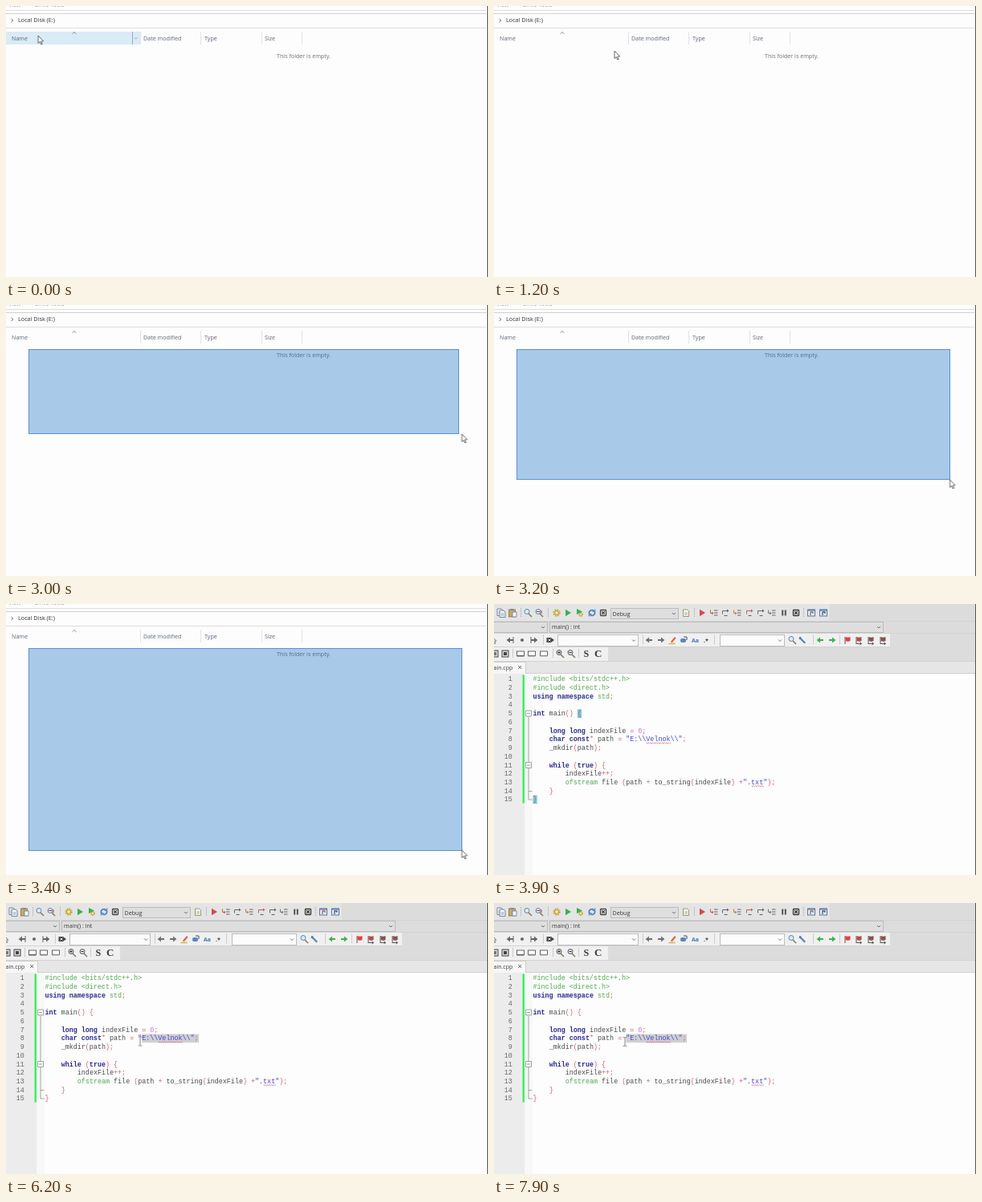
An HTML page for the animation above (8000 ms loop, 600x338 px).

```html
<!DOCTYPE html>
<html lang="en">
<head>
<meta charset="utf-8">
<title>Folder and editor</title>
<style>
html, body { margin: 0; width: 100%; height: 100%; overflow: hidden; background: #fff; }
svg { display: block; width: 100%; height: 100%; }
text { font: 7.15px "Open Sans", "Noto Sans", sans-serif; fill: #5b6776; }
.ui text { fill: #3a3a3a; }
.code text { font: 8.4px "Liberation Mono", "Courier New", monospace; fill: #4a4a4a; }
.code .num { fill: #686868; text-anchor: end; }
.pre, .type { fill: #4fa850; }
.key { fill: #2b2b92; font-weight: bold; }
.str { fill: #4646d6; }
.dig { fill: #d56cd0; }
.op { fill: #d8606c; }
.hover rect { fill: #d9ebf7; }
.hover path { fill: none; stroke: #8d9fae; stroke-width: .8; }

.anim { animation: 8s step-end infinite; }
#folder { animation-name: folder; }
#editor { animation-name: editor; }
#hoverName { animation-name: hoverName; }
#hoverDate { animation-name: hoverDate; }
#hoverType { animation-name: hoverType; }
#arrow { animation-name: arrow; }
#drag { animation-name: drag; }
#braces { animation-name: braces; }
#caret { animation-name: caret; }
#ibeam { animation-name: ibeam; }
#mark { animation-name: mark; }

@keyframes folder { 0% { opacity: 1 } 46.25%, 100% { opacity: 0 } }
@keyframes editor { 0% { opacity: 0 } 46.25%, 100% { opacity: 1 } }
@keyframes hoverName { 0% { opacity: 1 } 3.75%, 100% { opacity: 0 } }
@keyframes hoverDate { 0% { opacity: 0 } 3.75% { opacity: 1 } 5%, 100% { opacity: 0 } }
@keyframes hoverType { 0% { opacity: 0 } 5% { opacity: 1 } 7.5%, 100% { opacity: 0 } }
@keyframes arrow {
  0% { transform: translate(40px, 37px); animation-timing-function: steps(5) }
  6.25% { transform: translate(317px, 33px) }
  7.5% { transform: translate(310px, 20px); animation-timing-function: steps(3) }
  11.25% { transform: translate(197px, 11px) }
  12.5% { transform: translate(194px, 15px) }
  13.75% { transform: translate(188px, 20px) }
  15% { transform: translate(150px, 56px); animation-timing-function: steps(2) }
  17.5% { transform: translate(90px, 75px); animation-timing-function: steps(4) }
  22.5% { transform: translate(28px, 55px); animation-timing-function: steps(2) }
  25% { transform: translate(60px, 67px) }
  30% { transform: translate(253px, 88px); animation-timing-function: steps(3) }
  33.75% { transform: translate(425px, 116px); animation-timing-function: steps(3) }
  37.5% { transform: translate(567.5px, 161px); animation-timing-function: steps(2) }
  40% { transform: translate(567.5px, 218px); animation-timing-function: steps(2) }
  42.5%, 100% { transform: translate(567.5px, 307px) }
}
@keyframes drag {
  0% { width: 0; height: 0 }
  22.5% { width: 0; height: 0; animation-timing-function: steps(2) }
  25% { width: 32px; height: 12px }
  30% { width: 224px; height: 32px; animation-timing-function: steps(3) }
  33.75% { width: 394px; height: 60px; animation-timing-function: steps(3) }
  37.5% { width: 535px; height: 105px; animation-timing-function: steps(2) }
  40% { width: 539px; height: 162px; animation-timing-function: steps(2) }
  42.5%, 100% { width: 539px; height: 252px }
}
@keyframes braces { 0% { opacity: 1 } 66.25%, 100% { opacity: 0 } }
@keyframes caret { 0% { opacity: 0 } 66.25% { opacity: 1 } 70%, 100% { opacity: 0 } }
@keyframes ibeam {
  0% { opacity: 0; transform: translate(303px, 294px) }
  52.5% { opacity: 1; transform: translate(303px, 294px); animation-timing-function: steps(9) }
  63.75% { opacity: 1; transform: translate(248.5px, 170.5px) }
  68.75% { opacity: 1; transform: translate(248.5px, 170.5px); animation-timing-function: steps(7) }
  77.5% { opacity: 1; transform: translate(167px, 172.5px) }
  81.25% { opacity: 1; transform: translate(168px, 173px); animation-timing-function: steps(4) }
  92.5% { opacity: 1; transform: translate(167px, 173px); animation-timing-function: steps(5) }
  97.5%, 100% { opacity: 1; transform: translate(163px, 173px) }
}
@keyframes mark {
  0% { width: 0 }
  68.75% { width: 0; animation-timing-function: steps(7) }
  77.5% { width: 70.6px }
  93.75%, 100% { width: 75.6px }
}
</style>
</head>
<body>
<svg viewBox="0 0 600 338" preserveAspectRatio="none">
  <defs>
    <g id="page"><path d="M-3.5-4h5l2 2v6.5h-7z" fill="#f4f4f4" stroke="currentColor" stroke-width=".9"/><path d="M-2 0h4M-2 2h4" stroke="currentColor" stroke-width=".7"/></g>
    <g id="copy"><use href="#page" x="-1.5" y="-1"/><use href="#page" x="1.5" y="1"/></g>
    <g id="paste"><rect x="-4.5" y="-4" width="8" height="9" fill="#c4a868" stroke="#8a7444" stroke-width=".8"/><path d="M-2.5-5h4v2h-4z" fill="#888"/><rect x="0" y="-1" width="5" height="6" fill="#f4f4f4" stroke="#66809f" stroke-width=".8"/></g>
    <g id="lens"><path d="M1 1l4 4" stroke="#8a7a5a" stroke-width="1.6"/><circle cx="-1" cy="-1.5" r="3" fill="#dcebf6" stroke="currentColor" stroke-width="1"/></g>
    <g id="swap"><use href="#lens"/><path d="M-3-1.5h4M3-3v4" stroke="#a04040" stroke-width="1"/></g>
    <g id="zoom"><use href="#lens"/><path d="M-2.7-1.5h3.4" stroke="#222" stroke-width=".9"/></g>
    <g id="zoomin"><use href="#zoom"/><path d="M-1-3.2v3.4" stroke="#222" stroke-width=".9"/></g>
    <g id="gear"><circle r="3.8" fill="none" stroke="currentColor" stroke-width="1.8" stroke-dasharray="1.7 1.28"/><circle r="2.5" fill="#f4ecc0" stroke="currentColor" stroke-width="1.5"/></g>
    <path id="play" d="M-3-4.3L4 0l-7 4.3z" fill="currentColor"/>
    <g id="build"><g transform="translate(1 2) scale(.65)" color="#c8ac40"><use href="#gear"/></g><path d="M-4-5L3-1.500l-7 3.500z" fill="#3cb050"/></g>
    <g id="redo" fill="none" stroke="currentColor" stroke-width="1.7"><path d="M-3.500 1a3.600 3.600 0 0 1 6-3.400M3.500-1a3.600 3.600 0 0 1-6 3.400"/><path d="M3.700-4.500v3h-3M-3.700 4.500v-3h3" stroke-width="1.1"/></g>
    <g id="stop" fill="#eee" stroke="currentColor"><rect x="-3.500" y="-3.500" width="7" height="7" rx=".8" stroke-width="1.300"/><path d="M-1.800-1.800l3.600 3.600M1.800-1.800l-3.600 3.600" stroke-width="1.300"/></g>
    <g id="into"><path d="M0-3h4.500M0 0h4.500M0 3h4.500" stroke="#666"/><path d="M-4.500-3.500v4h2" fill="none" stroke="currentColor"/><path d="M-2.800-1.500L-.5.500l-2.300 2z" fill="currentColor"/></g>
    <g id="over"><path d="M-1.500 3.500h4" stroke="#666" stroke-width="1.100"/><path d="M-3.500 1.500v-4h6" fill="none" stroke="currentColor"/><path d="M2-4.500l2.500 2L2-.500z" fill="currentColor"/></g>
    <path id="pause" d="M-2.800-3.500h2v7h-2zM.8-3.500h2v7h-2z" fill="currentColor"/>
    <g id="win"><rect x="-4.500" y="-4" width="9" height="8" fill="#e6eef6" stroke="#5478ac"/><path d="M-4.500-3.200h9" stroke="#5478ac" stroke-width="1.400"/><path d="M-1 3v-4h3v2" fill="none" stroke="currentColor" stroke-width="1.300"/></g>
    <path id="right" d="M-4-1.100h4v-2.300L4.400 0 0 3.400V1.100h-4z" fill="currentColor"/>
    <path id="left" d="M4-1.100H0v-2.300L-4.400 0 0 3.400V1.100h4z" fill="currentColor"/>
    <g id="prev"><use href="#left"/><path d="M4-4v8" stroke="currentColor"/></g>
    <g id="next"><use href="#right"/><path d="M-4-4v8" stroke="currentColor"/></g>
    <g id="flag"><path d="M-3-4v9" stroke="#666" stroke-width="1.100"/><path d="M-2.500-4q3 1.600 6 0v5q-3 1.600-6 0z" fill="currentColor"/></g>
    <g id="jump"><use href="#flag"/><path d="M-3 4.500h6.500M1.500 2.500l2 2-2 1.500" fill="none" stroke="#444" stroke-width=".9"/></g>
    <g id="pen"><path d="M-2 2l5-6 1.500 1.500-5 6z" fill="#d8604c"/><path d="M-4.500 4.500h8" stroke="#d8b440" stroke-width="1.500"/></g>
    <g id="match"><rect x="-4" y="-2" width="7" height="5" rx="2" fill="currentColor"/><path d="M0-4h4v4" fill="none" stroke="#456"/></g>
    <path id="wrench" d="M-4-4l2 0 1 2 5 5-1.500 1.500-5-5-2-1z" fill="currentColor"/>
    <g id="tag"><path d="M-4.500-3h5.500L5 0 1 3h-5.500z" fill="currentColor"/><path d="M-2.500-1.500l3 3m0-3l-3 3" stroke="#fff" stroke-width=".9"/></g>
    <circle id="dot" r="2" fill="currentColor"/>
    <path id="cursor" d="M-3-5v8l2-1.500 1.500 3L2 4 .500 1H3z" fill="#f8f8f8" stroke="currentColor" stroke-width=".8"/>
    <g id="box"><rect x="-4.500" y="-3" width="9" height="5.500" fill="#fff" stroke="#555" stroke-width=".9"/><path d="M-4.500 3h9" stroke="currentColor"/></g>
    <g id="panel"><rect x="-4" y="-4" width="8" height="8" fill="#ddd" stroke="#444"/><rect x="-2" y="-2" width="4" height="4" fill="currentColor"/></g>
  </defs>

  <g id="folder" class="anim">
    <rect width="600" height="338" fill="#fdfdfe"/>
    <text x="3" y="1.200" fill-opacity=".7">View</text>
    <text x="36" y="1.200" fill-opacity=".7">Drive Tools</text>
    <path d="M0 5.500h598M0 27.500h598" stroke="#dedede"/>
    <path d="M0 9.500h598" stroke="#d0d0d0"/>
    <path d="M6.500 15.800l2.200 2.200-2.200 2.200" fill="none" stroke="#555" stroke-width=".9"/>
    <text x="15" y="20.400" style="fill:#333;font-size:7.250px">Local Disk (E:)</text>
    <g id="hoverName" class="anim hover"><rect y="32" width="167" height="16"/><path d="M157.500 32v16M159.700 39.200l2 2 2-2"/></g>
    <g id="hoverDate" class="anim hover"><rect x="167" y="32" width="75" height="16"/><path d="M232.500 32v16M234.700 39.200l2 2 2-2"/></g>
    <g id="hoverType" class="anim hover"><rect x="242" y="32" width="76" height="16"/><path d="M308.500 32v16M310.700 39.200l2 2 2-2"/></g>
    <path d="M167.500 32v16M242.500 32v16M318.500 32v16M368.500 32v16" stroke="#e2e2e2"/>
    <path d="M82.500 34.800l2.500-2.300 2.500 2.300" fill="none" stroke="#777" stroke-width=".8"/>
    <text x="7" y="42.600">Name</text>
    <text x="171" y="42.600">Date modified</text>
    <text x="247" y="42.600">Type</text>
    <text x="322" y="42.600">Size</text>
    <text x="337" y="64.600" style="fill:#707070">This folder is empty.</text>
    <rect id="drag" class="anim" x="28.500" y="55.500" fill="#0062be" fill-opacity=".33" stroke="#5c92c8"/>
    <path id="arrow" class="anim" d="M0 0v9.500l2.200-2 1.500 3.500 1.500-.6-1.500-3.400 2.900-.2z" fill="#fff" stroke="#444" stroke-width=".8"/>
  </g>

  <g id="editor" class="anim">
    <rect width="600" height="338" fill="#fdfdfd"/>
    <rect width="600" height="72" fill="#dcdcdc"/>
    <rect y="72" width="600" height="15" fill="#e6e6e6"/>
    <path d="M0 0h418v21H0z" fill="#e4e4e4"/>
    <path d="M0 37h493v17H0zM0 54h142v17H0z" fill="#f0f0f0"/>
    <path d="M0 21.500h600M0 36.500h600M0 53.500h493M0 71.500h600" stroke="#d2d2d2"/>
    <g class="ui" id="bars"></g>
    <g class="ui">
      <text x="147.500" y="14.500">Debug</text>
      <text x="72" y="31">main() : int</text>
      <text x="246" y="47.500" style="font-size:7px;font-weight:bold;fill:#4a76b4">Aa</text>
      <text x="261" y="48" style="font-weight:bold">.*</text>
      <text x="111.500" y="65.800" style="font:bold 12px 'Liberation Serif',serif">S</text>
      <text x="125" y="66" style="font:bold 13px 'Liberation Serif',serif">C</text>
      <path d="M0 72.500h39.500V87H0z" fill="#f7f7f7"/>
      <path d="M0 72.500h39.500V87M39 86.500h561" fill="none" stroke="#cfcfcf"/>
      <text x="-7" y="81.600" style="font-size:7px">main.cpp</text>
      <path d="M30.200 77l4 4m0-4l-4 4" stroke="#555" stroke-width=".9"/>
    </g>
    <rect y="87" width="38" height="251" fill="#ececec"/>
    <rect x="38" y="87" width="10" height="251" fill="#f8f8f8"/>
    <rect x="35.500" y="88.500" width="2.500" height="160" fill="#38f25c"/>
    <g fill="none" stroke="#999" stroke-width=".9">
      <path d="M43 140.500v56.500M43 205v39h4.500M43 233.500h4.500"/>
      <path d="M39.500 133h7v7h-7zM41 136.500h4M39.500 197.500h7v7h-7zM41 201h4"/>
    </g>
    <rect id="mark" class="anim" transform="translate(240 163.500) scale(-1 1)" height="10.700" fill="#cfcfd3"/>
    <g id="braces" class="anim" fill="#6fcbe0"><rect x="103.900" y="131.300" width="5.100" height="10.700"/><rect x="48.500" y="238.500" width="5.100" height="10.700"/></g>
    <g class="code" id="code"></g>
    <path id="caret" class="anim" d="M240.500 164v10.500" stroke="#000"/>
    <path id="ibeam" class="anim" d="M-2.200-5.500h1.500l.7.700.7-.7h1.500M0-5V5M-2.200 5.500h1.500l.7-.7.7.7h1.500" fill="none" stroke="#666" stroke-width=".8"/>
  </g>
  <path d="M599.500 0v338" stroke="#555"/>
</svg>
<script>
const put = (id, html) => document.getElementById(id).insertAdjacentHTML('beforeend', html);

// Toolbars: each row is a height and a list of icon, x, colour.
const rows = [
  [11, 'copy 9 #66809f,paste 23 #000,lens 42 #5a84b4,swap 56 #5a84b4,gear 78 #c8ac40,play 92 #3cb050,build 107 #000,redo 122 #4a80c4,stop 136 #444,page 239 #8f9460,play 259 #d84848,into 274 #c86048,over 288 #666,into 303 #c08048,over 318 #c06060,over 332 #666,into 346 #707880,pause 361 #555,stop 376 #333,win 395 #b06a40,win 410 #556'],
  [45, 'cursor 0 #666,prev 20 #666,dot 35 #666,next 50 #666,tag 70 #444,left 193 #707070,right 208 #707070,pen 222 #000,match 236 #5c86bc,lens 371 #5a84b4,wrench 384 #5c80b0,left 406 #3cb050,right 421 #3cb050,flag 440 #e04040,jump 454 #b04c4c,jump 469 #8a5050,jump 484 #8a5050'],
  [62, 'panel 1 #777,panel 14 #444,box 33 #555,box 47 #888,box 62 #aaa,zoomin 82 #555,zoom 96 #555']
];
for (const [y, list] of rows)
  for (const item of list.split(',')) {
    const [id, x, color] = item.split(' ');
    put('bars', `<use href="#${id}" x="${x}" y="${y}" color="${color}"/>`);
  }

const combo = (x, y, w, h, fill) => put('bars',
  `<rect x="${x + .5}" y="${y + .5}" width="${w}" height="${h}" fill="${fill}" stroke="#bcbcbc"/>
   <path d="M${x + w - 7} ${y + h / 2 - .5}l2 2 2-2" fill="none" stroke="#666" stroke-width=".9"/>`);
combo(145, 5, 84, 13, '#dedede');
combo(-4, 22, 70, 13, '#dedede');
combo(69, 22, 415, 13, '#dedede');
combo(79, 38, 100, 14, '#fcfcfc');
combo(281, 38, 80, 14, '#fcfcfc');

// Dotted grips between toolbars
const grip = (y, ...xs) => xs.forEach(x =>
  put('bars', `<path d="M${x}.5 ${y - 6}v12" stroke="#a8a8a8" stroke-dasharray="1 1"/>`));
grip(11, 33, 67, 249, 385);
grip(45, 61, 185, 274, 397, 430);
grip(62, 23, 73, 105);

const lines = String.raw`#include <bits/stdc++.h>
#include <direct.h>
using namespace std;

int main() {

    long long indexFile = 0;
    char const* path = "E:\\Velnok\\";
    _mkdir(path);

    while (true) {
        indexFile++;
        ofstream file (path + to_string(indexFile) +".txt");
    }
}`.split('\n');

const left = 48.5, cell = 5.041, base = 96.3, step = 10.72;
const esc = s => s.replace(/</g, '&lt;').replace(/>/g, '&gt;');
const rules = [
  ['pre', /^#.*/], ['str', /^"[^"]*"/],
  ['key', /^(using|namespace|int|long|char|const|while|true)\b/],
  ['type', /^(std|ofstream)\b/], ['dig', /^\d+/],
  ['id', /^\w+/], ['op', /^[^\w\s"]+/], ['gap', /^\s+/]
];

function paint(src) {
  let out = '';
  while (src) {
    const [name, re] = rules.find(r => r[1].test(src));
    const word = src.match(re)[0];
    out += `<tspan class="${name}">${esc(word)}</tspan>`;
    src = src.slice(word.length);
  }
  return out;
}

// Wavy spelling mark under some columns of a line
function wave(line, col, count) {
  const y = base + step * (line - 1) + 1.6;
  const bumps = 'l1.26 1.2l1.26-1.2'.repeat(count * 2);
  put('code', `<path d="M${left + col * cell} ${y}${bumps}" fill="none" stroke="#e05060" stroke-width=".7"/>`);
}

lines.forEach((line, i) => {
  const y = base + step * i, body = line.trimStart();
  const x = left + (line.length - body.length) * cell;
  put('code', `<text class="num" x="22.8" y="${y}">${i + 1}</text><text x="${x}" y="${y}">${paint(body)}</text>`);
});
wave(8, 28, 6);
wave(13, 54, 3);
</script>
</body>
</html>
```
